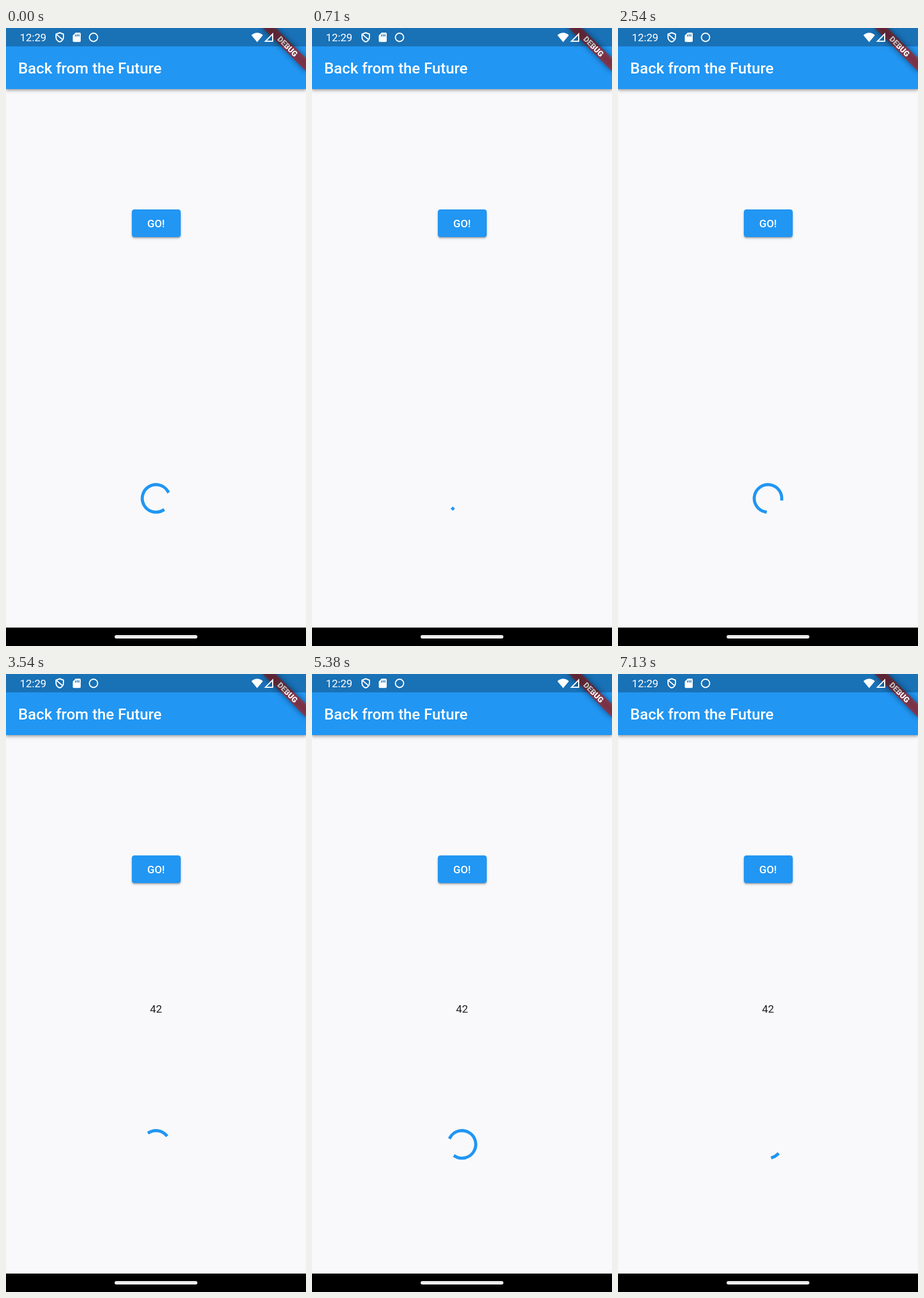
Write an HTML page that moves like this. It is 522x1073 px and loops after 7170 ms.

```html
<!DOCTYPE html>
<html lang="en">
<head>
<meta charset="utf-8">
<title>Back from the Future</title>
<style>
  html, body { margin: 0; width: 100%; height: 100%; overflow: hidden; }
  body { position: relative; background: #f9f9fb; font-family: Roboto, sans-serif; }
  .bar, .button, svg { position: absolute; }
  .bar {
    left: 0; top: 0; width: 522px; height: 106.3px; background: #2196f3;
    box-shadow: 0 2px 4px rgba(0,0,0,.26), 0 4px 6px rgba(0,0,0,.12);
  }
  .button {
    left: 218.5px; top: 314.8px; width: 85px; height: 47.8px;
    border-radius: 4.5px; background: #2196f3;
    box-shadow: 0 1.5px 2px rgba(0,0,0,.24), 0 2.5px 4px rgba(0,0,0,.16);
  }
  svg { left: 0; top: 0; }
  text { fill: #fff; font-size: 18.6px; }
  .medium { font-weight: 500; }
  .title { font-size: 26.6px; }
  .banner { font-size: 13.56px; font-weight: 900; }
  .answer { fill: rgba(0,0,0,.87); }
  .mid { text-anchor: middle; }
  .line { fill: none; stroke: #fff; stroke-width: 2; }
</style>
</head>
<body>
<div class="bar"></div>
<div class="button"></div>
<svg width="522" height="1073" viewBox="0 0 522 1073">
  <defs>
    <filter id="soft" x="-30%" y="-150%" width="160%" height="400%">
      <feGaussianBlur stdDeviation="5.2"/>
    </filter>
  </defs>

  <text class="medium title" x="21.3" y="79">Back from the Future</text>
  <text class="medium mid" x="261" y="345.5">GO!</text>
  <text class="answer mid" id="answer" x="261" y="588.3">42</text>
  <path id="arc" fill="none" stroke="#2196f3" stroke-width="5.32" stroke-linecap="square"/>

  <!-- corner banner -->
  <g transform="translate(522 0) rotate(45)">
    <rect x="-53.2" y="37.2" width="106.4" height="16" fill="#000" fill-opacity=".5" filter="url(#soft)"/>
    <rect x="-53.2" y="37.2" width="106.4" height="16" fill="#b71c1c" fill-opacity=".627"/>
    <text class="banner mid" x="0" y="50.1">DEBUG</text>
  </g>

  <!-- status bar -->
  <rect width="522" height="31.9" fill-opacity=".25"/>
  <text x="24" y="23">12:29</text>
  <path class="line" d="M93.5 8.2 L87 10.8 V15.5 C87 19.5 89.6 22.8 93.5 24 C97.4 22.8 100 19.5 100 15.5 V10.8 Z M87.5 11 L98.8 20.5"/>
  <path fill="#fff" fill-rule="evenodd" d="M121.2 8 H128.2 Q130 8 130 9.8 V22.4 Q130 24.2 128.2 24.2 H118 Q116.2 24.2 116.2 22.4 V13 Z M120 11.6 V14.8 H121.6 V11.6 Z M123 11 V14.8 H124.6 V11 Z M126 11 V14.8 H127.6 V11 Z"/>
  <circle class="line" cx="152.3" cy="16.2" r="7.2"/>
  <path fill="#fff" d="M427 12.4 Q437 4 447 12.4 L437 24.4 Z"/>
  <path class="line" d="M451.5 23 H464 V10.5 Z"/>

  <!-- navigation bar -->
  <rect y="1041" width="522" height="32"/>
  <rect x="189" y="1054" width="144" height="6" rx="3" fill="#ececec"/>
</svg>
<script>
  const LOOP = 7170, STEP = 1000 / 24, ANSWER_AT = 3540;
  const CYCLE = 1333, SPIN = 2230;
  const CYCLE_PHASE = 0.478, SPIN_PHASE = 0.296;
  const CX = 261, CY = 816.7, R = 23.93;
  const arc = document.getElementById('arc');
  const answer = document.getElementById('answer');

  // cubic-bezier(.4, 0, .2, 1)
  function ease(x) {
    if (x <= 0) return 0;
    if (x >= 1) return 1;
    let lo = 0, hi = 1, s = 0.5;
    for (let i = 0; i < 24; i++) {
      s = (lo + hi) / 2;
      const px = 1.2 * s * (1 - s) ** 2 + 0.6 * s * s * (1 - s) + s ** 3;
      if (px < x) lo = s; else hi = s;
    }
    return s * s * (3 - 2 * s);
  }

  const point = a => `${(CX + R * Math.cos(a)).toFixed(3)} ${(CY + R * Math.sin(a)).toFixed(3)}`;

  function draw(time) {
    const t = Math.floor((time + 5) / STEP) * STEP;
    const phase = (CYCLE_PHASE + t / CYCLE) % 1;
    const turn = (SPIN_PHASE + t / SPIN) % 1;
    const head = ease(phase * 2), tail = ease(phase * 2 - 1);
    const start = Math.PI * (-0.5 + 1.5 * tail + 0.5 * phase + 2 * turn);
    const sweep = Math.max(1.5 * Math.PI * (head - tail), 0.005);
    const large = sweep > Math.PI ? 1 : 0;
    arc.setAttribute('d', `M${point(start)} A${R} ${R} 0 ${large} 1 ${point(start + sweep)}`);
    answer.style.visibility = time >= ANSWER_AT ? 'visible' : 'hidden';
  }

  const begin = performance.now();
  function tick() {
    draw((performance.now() - begin) % LOOP);
    requestAnimationFrame(tick);
  }
  tick();
</script>
</body>
</html>
```
